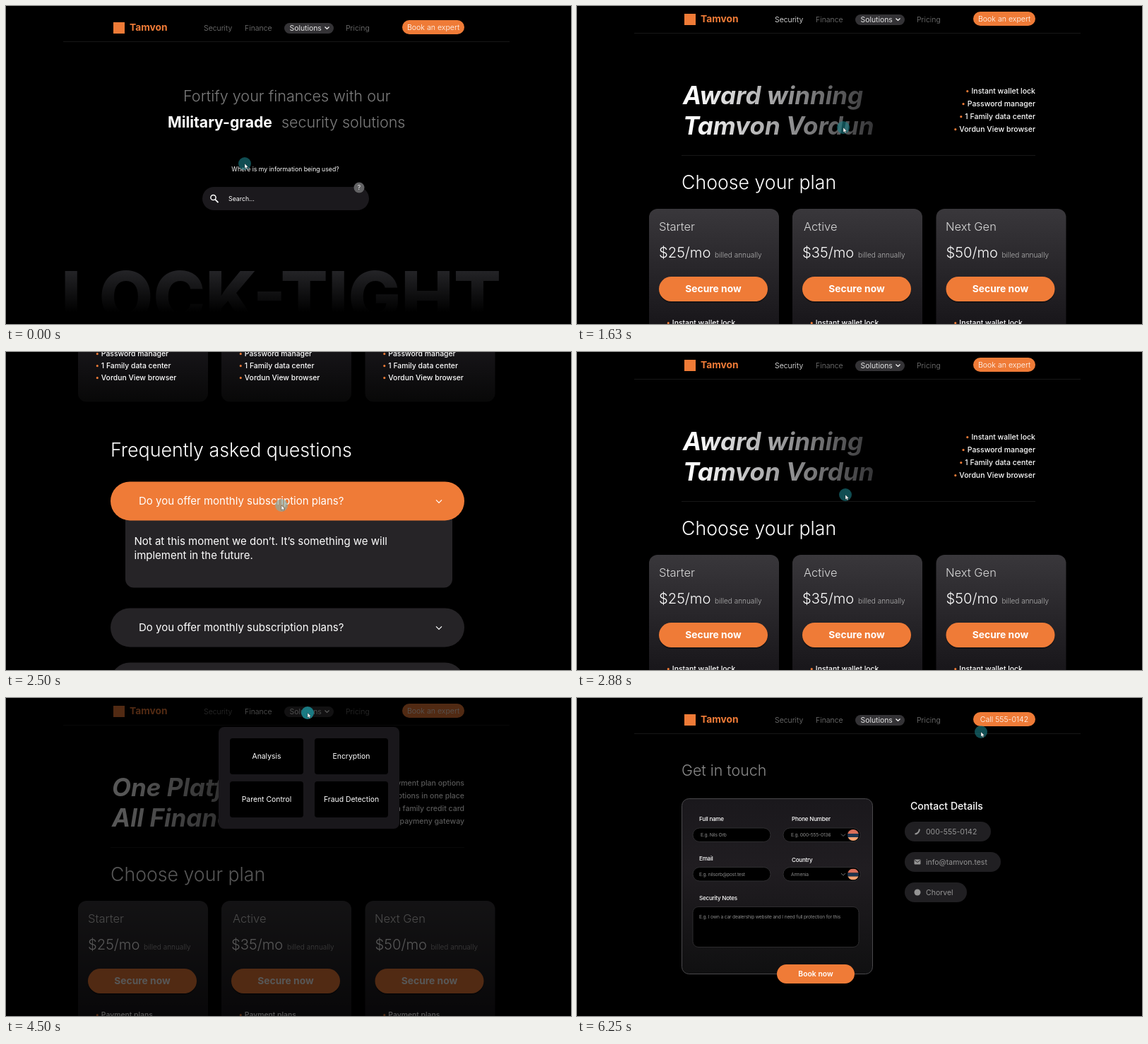
Animation of 800 by 450 pixels, one loop 6380 ms. Source, as an HTML page:

```html
<!DOCTYPE html>
<html lang="en">
<head>
<meta charset="utf-8">
<style>
  html, body { margin: 0; width: 100%; height: 100%; overflow: hidden; background: #000; }
  svg { display: block; width: 800px; height: 450px; font-family: Inter, sans-serif; font-optical-sizing: none; }
</style>
</head>
<body>
<svg id="stage" viewBox="0 0 800 450"></svg>
<script>
const ORANGE = '#ef7b37', GREY = '#7c7c7c', WHITE = '#fff';
const LOOP = 6380, STEP = 125;

const text = (x, y, size, str, fill = WHITE, weight = 400, extra = '') =>
  `<text x="${x}" y="${y}" font-size="${size}" fill="${fill}" font-weight="${weight}" ${extra}>${str}</text>`;
const mid = (x, y, size, str, fill, weight) => text(x, y, size, str, fill, weight, 'text-anchor="middle"');
const rect = (x, y, w, h, r, fill, extra = '') =>
  `<rect x="${x}" y="${y}" width="${w}" height="${h}" rx="${r}" fill="${fill}" ${extra}/>`;
const line = (d, stroke, width = 1) => `<path d="${d}" fill="none" stroke="${stroke}" stroke-width="${width}"/>`;
const chevron = (x, y, s, color = WHITE, width = 1.2) => line(`M${x - s} ${y - s / 2}l${s} ${s}l${s} ${-s}`, color, width);
const bullet = str => `<tspan fill="${ORANGE}">•</tspan> ${str}`;
const gradient = (id, stops, coords) =>
  `<linearGradient id="${id}" gradientUnits="userSpaceOnUse" ${coords}>` +
  stops.map(([at, color]) => `<stop offset="${at}" stop-color="${color}"/>`).join('') +
  '</linearGradient>';
const page = (id, body) => `<g id="${id}">${rect(0, 0, 800, 450, 0, '#000')}${body}</g>`;

function header(y, active, button = 'Book an expert') {
  const nav = (x, name) => text(x, y + 5, 10.5, name, name === active ? WHITE : GREY, 300);
  return rect(152, y - 7, 16, 16, 0, ORANGE) +
    text(175, y + 5, 13.8, 'Tamvon', ORANGE, 700) +
    nav(280, 'Security') + nav(338, 'Finance') + nav(481, 'Pricing') +
    rect(394, y - 6, 70, 15, 7.5, '#343336') +
    text(401.5, y + 5, 10.4, 'Solutions', '#e4e4e4') + chevron(454.5, y + 1, 3) +
    rect(561, y - 10, 88, 20, 10, ORANGE) + mid(605, y + 4, 10.6, button, WHITE, 300) +
    line(`M81 ${y + 20.5}H713`, '#171717');
}

function home() {
  return header(30) +
    text(251, 135, 21.6, 'Fortify your finances with our', GREY, 300) +
    text(229, 172, 21.2, 'Military-grade', WHITE, 700) +
    text(390, 172, 21.5, 'security solutions', GREY, 300) +
    mid(395.5, 233.5, 8.7, 'Where is my information being used?') +
    rect(278, 256, 236, 33, 16.5, '#1b191d') +
    `<circle cx="293.5" cy="271" r="3.6" fill="none" stroke="#fff" stroke-width="1.5"/>` +
    line('M296 273.700l4.500 4.500', WHITE, 1.8) +
    text(315, 276, 8.8, 'Search...') +
    '<circle cx="500" cy="257" r="7.5" fill="#626264"/>' + mid(500, 260.2, 8.5, '?') +
    text(78, 447, 99.5, 'LOCK-TIGHT', 'url(#fade)', 800);
}

function card(x, name, nameX, price, features) {
  return rect(x, 287, 184, 246, 12, 'url(#card)') +
    text(nameX, 318, 16.5, name, '#d8d8d8', 300) +
    text(x + 14, 356, 20.2, price, WHITE, 300) +
    text(x + 93, 356, 10, 'billed annually', '#b0b0b0', 300) +
    rect(x + 14, 385, 154, 35, 17.5, '#000', 'opacity=".35"') +
    rect(x + 14, 383, 154, 35, 17.5, ORANGE) + mid(x + 91, 405, 13.8, 'Secure now', WHITE, 700) +
    features.map((f, i) => text(x + 24.5, 452 + i * 17, 10.4, bullet(f), WHITE, 500)).join('');
}

function plans(active, titles, points, features) {
  return header(18, active) +
    titles.map((s, i) => text(150, 139 + i * 43, 35, s, 'url(#title)', 700, 'font-style="italic"')).join('') +
    points.map((s, i) => text(649, 124.3 + i * 18, 10.5, bullet(s), WHITE, 500, 'text-anchor="end"')).join('') +
    line('M148 211.500H649', '#171717') +
    text(148, 259, 26.7, 'Choose your plan', WHITE, 300) +
    card(102, 'Starter', 116, '$25/mo', features) +
    card(305, 'Active', 321, '$35/mo', features) +
    card(508.5, 'Next Gen', 522, '$50/mo', features);
}

function faq() {
  const question = (y, fill) => rect(148, y, 501, 55, 27.5, fill) +
    text(188, y + 33, 15, 'Do you offer monthly subscription plans?') + chevron(613, y + 28, 4);
  return text(148, 611, 26.8, 'Frequently asked questions', WHITE, 300) +
    rect(169, 670, 463, 126, 12, '#262427') + question(646, ORANGE) +
    text(181.5, 736, 15, 'Not at this moment we don’t. It’s something we will') +
    text(181.5, 755.5, 15, 'implement in the future.') +
    question(825, '#252326') + question(902, '#252326');
}

function contact() {
  const tight = 'letter-spacing="-.03em"';
  const label = (x, y, s) => text(x, y, 8.1, s, WHITE, 500, tight);
  const input = (x, y, w, h, r, s, dx, dy) =>
    rect(x, y, w, h, r, '#000', 'stroke="#363538" stroke-width=".8"') + text(x + dx, y + dy, 6.7, s, '#8b8b8b', 400, tight);
  const flag = y => chevron(377, y, 3, '#8b8b8b', 0.8) +
    `<g clip-path="url(#round)" transform="translate(391 ${y})">` +
    rect(-8, -8, 16, 6, 0, '#d96f5a') + rect(-8, -2, 16, 5, 0, '#1d3550') + rect(-8, 3, 16, 5, 0, '#f2a272') + '</g>';
  const pill = (y, w, s) => rect(464, y, w, 28, 14, '#201f22') + text(494, y + 17.8, 10.5, s, '#949494');
  return header(30, '', 'Call 555-0142') +
    text(148, 110, 21.4, 'Get in touch', '#8a8a8a', 300) +
    rect(148.5, 142.5, 270, 248, 10, 'url(#form)', 'stroke="#4a494c"') +
    label(173, 174, 'Full name') + input(164, 184, 110, 19.5, 9.7, 'E.g. Nils Orb', 11, 12) +
    label(304, 174, 'Phone Number') + input(292, 184, 109, 19.5, 9.7, 'E.g. 000-555-0136', 11, 12) + flag(194) +
    label(173, 230, 'Email') + input(164, 239.5, 110, 19.5, 9.7, 'E.g. nilsorb@post.test', 9, 12) +
    label(304, 232, 'Country') + input(292, 239.5, 109, 19.5, 9.7, 'Armenia', 11, 12) + flag(249.5) +
    label(173, 286, 'Security Notes') +
    input(164, 295.5, 235, 57, 8, 'E.g. I own a car dealership website and I need full protection for this', 9, 16) +
    rect(283, 377, 110, 27, 13.5, ORANGE) + mid(338, 394.3, 10.4, 'Book now', WHITE, 600) +
    text(472, 158, 14.1, 'Contact Details', WHITE, 500) +
    pill(175, 122, '000-555-0142') + pill(218, 136, 'info@tamvon.test') + pill(261, 88, 'Chorvel') +
    line('M478.500 192.500q5.500-.5 6.500-7', '#949494', 2) +
    rect(477.5, 228.5, 9, 7, 1, '#949494') + line('M478 229.500l4 3l4-3', '#201f22', 0.9) +
    '<circle cx="482" cy="275" r="4.5" fill="#949494"/>';
}

function menu() {
  const tile = (x, y, s) => rect(x, y, 104, 51, 4, '#000') + mid(x + 52, y + 29, 10.4, s);
  return rect(0, 0, 800, 450, 0, '#000', 'opacity=".66"') + rect(301, 41, 256, 144, 8, '#19171b') +
    tile(317, 57, 'Analysis') + tile(437, 57, 'Encryption') +
    tile(317, 118, 'Parent Control') + tile(437, 118, 'Fraud Detection');
}

const $ = id => document.getElementById(id);
$('stage').innerHTML = '<defs>' +
  gradient('fade', [[0, '#242427'], [1, '#000']], 'x1="0" y1="374" x2="0" y2="433"') +
  gradient('title', [[0, '#fff'], [1, '#2c2c2e']], 'x1="165" y1="0" x2="430" y2="0"') +
  gradient('card', [[0, '#39373b'], [0.65, '#19171b'], [1, '#080808']], 'x1="0" y1="287" x2="0" y2="533"') +
  gradient('form', [[0, '#1a181c'], [0.4, '#201d21'], [1, '#101011']], 'x1="0" y1="142" x2="0" y2="390"') +
  '<clipPath id="round"><circle r="8"/></clipPath></defs>' +
  page('home', home()) +
  page('security', `<g id="scroller">${plans('Security', ['Award winning', 'Tamvon Vordun'],
    ['Instant wallet lock', 'Password manager', '1 Family data center', 'Vordun View browser'],
    ['Instant wallet lock', 'Password manager', '1 Family data center', 'Vordun View browser'])}${faq()}</g>`) +
  page('finance', plans('Finance', ['One Platform', 'All Finances'],
    ['Payment plan options', 'Subscriptions in one place', 'Open family credit card', 'Secure paymeny gateway'],
    ['Payment plans', 'Subscriptions', 'Family credit card', 'Payment gateway'])) +
  `<g id="menu">${menu()}</g>` +
  page('contact', contact()) +
  `<g id="cursor"><circle id="halo" r="9"/>
   <path d="M0 0v6.800l1.600-1.400l1.100 2.400l1.200-.6l-1.100-2.300h2.200z" fill="#fff" stroke="#222" stroke-width=".4"/></g>`;

// Pointer path: time, x, y
const PATH = [[0, 338, 223], [450, 300, 30], [700, 302, 22], [1375, 377, 172], [1625, 377, 172], [2000, 392, 118],
  [2250, 391, 70], [2375, 397, 113], [2500, 390, 217], [2875, 380, 202], [3250, 357, 20], [3625, 358, 22],
  [4250, 427, 21], [4500, 427, 21], [4800, 372, 84], [5100, 488, 140], [5600, 602, 20], [5800, 603, 20],
  [6250, 572, 48]];
const PRESSES = [[450, 600], [1700, 1850], [2450, 2600], [3250, 3400], [5700, 5850]];

const progress = (t, a, b) => Math.min(1, Math.max(0, (t - a) / (b - a)));
const smooth = p => p * p * (3 - 2 * p);
const smoother = p => p * p * p * (p * (6 * p - 15) + 10);
const easeOut = p => 1 - (1 - p) ** 2;

function pointer(t) {
  const i = PATH.findIndex(k => k[0] > t);
  if (i < 0) return PATH[PATH.length - 1].slice(1);
  const [t0, x0, y0] = PATH[i - 1], [t1, x1, y1] = PATH[i];
  const p = smooth(progress(t, t0, t1));
  return [x0 + (x1 - x0) * p, y0 + (y1 - y0) * p];
}

function draw(now) {
  const t = Math.min(50, Math.floor((now % LOOP) / STEP)) * STEP;
  const show = (id, alpha) => {
    $(id).setAttribute('opacity', alpha);
    $(id).setAttribute('display', alpha > 0 ? 'inline' : 'none');
  };
  show('security', easeOut(progress(t, 500, 1000)));
  show('finance', easeOut(progress(t, 3250, 3700)));
  show('menu', progress(t, 4200, 4500) - progress(t, 5100, 5400));
  show('contact', easeOut(progress(t, 5750, 6125)));

  const scroll = 516 * (smoother(progress(t, 1625, 2000)) - smoother(progress(t, 2375, 2875)));
  $('scroller').setAttribute('transform', `translate(0 ${-scroll})`);

  const pressed = PRESSES.some(([a, b]) => t >= a && t < b);
  const bright = t >= 4250 && t <= 4625;
  $('halo').setAttribute('fill', pressed ? '#7fb0b2' : '#1a8088');
  $('halo').setAttribute('opacity', bright ? 0.95 : 0.6);
  $('cursor').setAttribute('transform', `translate(${pointer(t)})`);
  requestAnimationFrame(draw);
}
draw(0);
</script>
</body>
</html>
```
